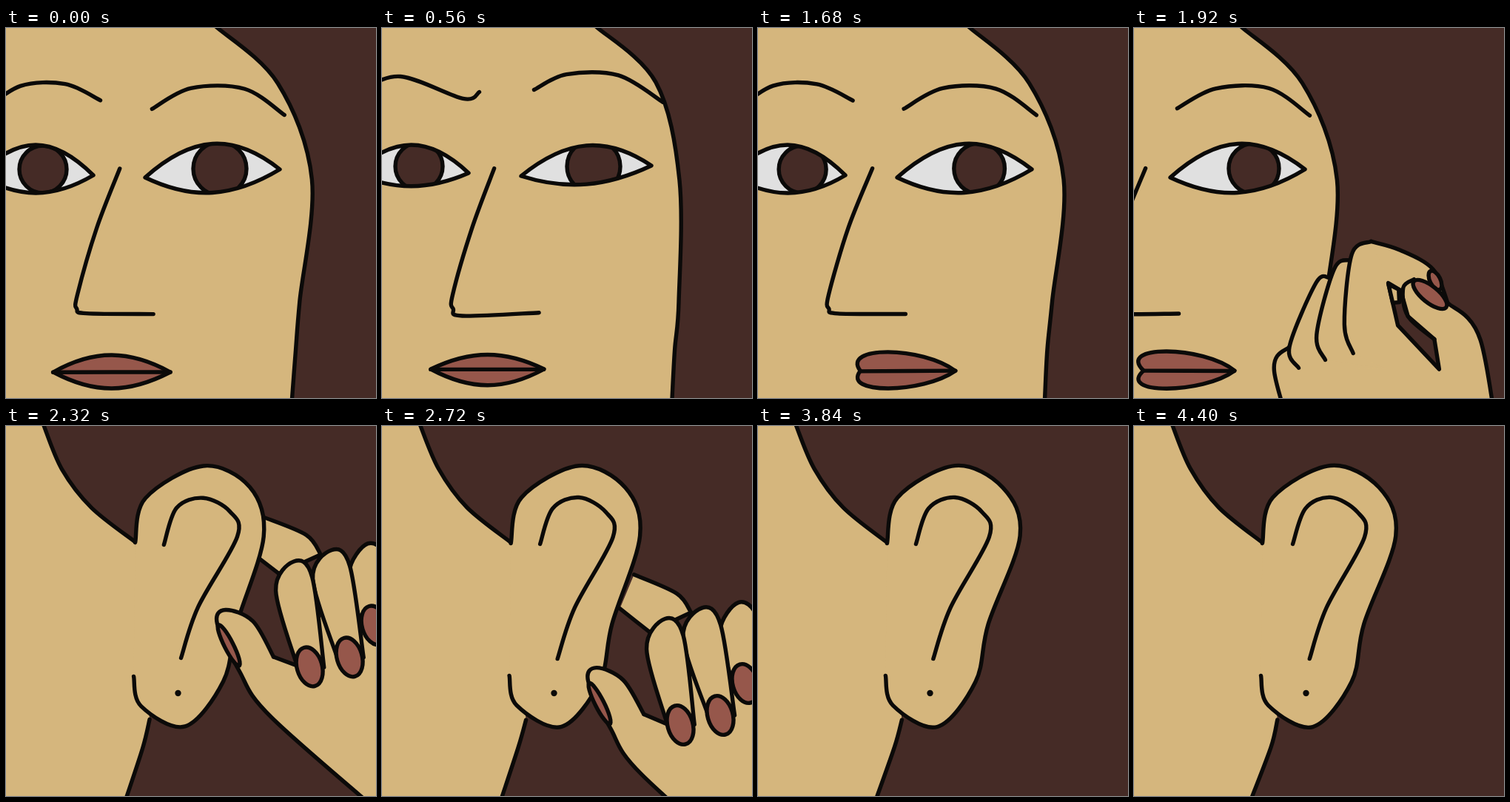
An HTML page with a canvas that plays this animation: 500 by 500 pixels, repeating every 4480 ms.

```html
<!DOCTYPE html>
<html lang="en">
<head>
<meta charset="utf-8">
<title>Tucking hair</title>
<style>
html, body { margin: 0; width: 100%; height: 100%; overflow: hidden; background: #452b26; }
canvas { display: block; width: 500px; height: 500px; }
</style>
</head>
<body>
<canvas id="stage" width="500" height="500"></canvas>
<script>
const ctx = document.getElementById('stage').getContext('2d');
const SKIN = '#d5b67d', HAIR = '#452b26', INK = '#0b0a09', WHITE = '#e0e0e0', LIP = '#96574b';
const LOOP = 4480, STEP = 80;
let frame = 0;

const linear = (t, a, b) => Math.min(1, Math.max(0, (t - a) / (b - a)));
const ease = (t, a, b) => {
  const k = linear(t, a, b);
  return k * k * (3 - 2 * k);
};
const lerp = (a, b, k) => a + (b - a) * k;
const mix = (from, to, k) => from.map(([x, y], i) => [lerp(x, to[i][0], k), lerp(y, to[i][1], k)]);

// Hand-drawn jitter, shared by points at the same place.
const wobble = ([x, y]) => {
  const s = Math.round(x) * 12.9 + Math.round(y) * 7.3 + frame * 41.7;
  return [x + 0.6 * Math.sin(s), y + 0.6 * Math.cos(s * 1.7)];
};

// Smooth sections through key points, joined by straight lines.
function spline(...sections) {
  const path = new Path2D();
  sections.forEach((points, n) => {
    const p = points.map(wobble);
    if (n) path.lineTo(...p[0]); else path.moveTo(...p[0]);
    for (let i = 0; i < p.length - 1; i++) {
      const b = p[i], c = p[i + 1], a = p[i - 1] || b, d = p[i + 2] || c;
      path.bezierCurveTo(b[0] + (c[0] - a[0]) / 6, b[1] + (c[1] - a[1]) / 6,
        c[0] - (d[0] - b[0]) / 6, c[1] - (d[1] - b[1]) / 6, ...c);
    }
  });
  return path;
}

function polygon(...points) {
  const path = new Path2D();
  points.forEach(p => path.lineTo(...wobble(p)));
  path.closePath();
  return path;
}

// Two arcs between two corners; a lower lead swells the first end.
function lens(x0, y0, x1, y1, top, bottom, lead = 0.35) {
  const at = (k, rise) => wobble([lerp(x0, x1, k), lerp(y0, y1, k) + rise * 4 / 3]);
  const path = new Path2D();
  path.moveTo(x0, y0);
  path.bezierCurveTo(...at(lead, -top), ...at(0.65, -top), x1, y1);
  path.bezierCurveTo(...at(0.65, bottom), ...at(lead, bottom), x0, y0);
  path.closePath();
  return path;
}

function oval(x, y, rx, ry = rx, angle = 0) {
  const path = new Path2D();
  path.ellipse(x, y, rx, ry, angle, 0, 2 * Math.PI);
  return path;
}

function fill(path, color) {
  ctx.fillStyle = color;
  ctx.fill(path);
}
const ink = path => ctx.stroke(path);
function shape(path, color) {
  fill(path, color);
  ink(path);
}
const nail = (...args) => shape(oval(...args), LIP);

function at(x, y, draw) {
  ctx.save();
  ctx.translate(x, y);
  draw();
  ctx.restore();
}

function eye(outline, iris) {
  fill(outline, WHITE);
  ctx.save();
  ctx.clip(outline);
  shape(iris, HAIR);
  ctx.restore();
  ink(outline);
}

function drawFace(t) {
  const s = ease(t, 160, 400) - ease(t, 1040, 1440); // squint
  const look = ease(t, 1440, 1760);
  const pan = 139 * linear(t, 1680, 1920) + 136 * linear(t, 1920, 2080);

  at(-Math.min(pan, 232), 0, () => {
    const edge = [[284, -2], [367, 74], [413, 205], [397, 370], [391, 435], [387, 502]]
      .map(([x, y]) => [x + s * (5 - 16 * Math.exp(-(((y - 200) / 90) ** 2))), y]);
    fill(spline(edge, [[-300, 520]], [[-300, -20]]), SKIN);
    ink(spline(edge));
  });

  at(-pan, 0, () => {
    eye(lens(-38, 199 - 3 * s, 118 - s, 199 - 3 * s, 41 - 3 * s, 24 - 6 * s),
      oval(50 + 12 * look, 191 - 4 * s, 32));
    eye(lens(188, 202 - 2 * s, 370 - 6 * s, 191 - 5 * s, 40 - 6 * s, 26 - 8 * s),
      oval(289 - 3 * s + 12 * look, 190 - 3 * s, 36 - 2 * look));
    ink(spline(mix([[-30, 112], [20, 78], [80, 76], [128, 98]], [[-30, 84], [25, 66], [110, 96], [131, 86]], s)));
    ink(spline(mix([[197, 109], [250, 82], [322, 82], [376, 118]], [[206, 83], [250, 62], [320, 64], [380, 100]], s)));
    ink(spline([[154 - 3 * s, 190], [122, 270], [96, 360], [96, 380], [108, 386 + 3 * s], [199 + 13 * s, 386 - s]]));

    const left = 64 + 2 * s + 88 * look, right = 222 - 3 * s + 53 * look, y = 465 - 4 * s - 2 * look;
    shape(lens(left, y, right, y, 23 - 3 * s + 3 * look, 22 + 2 * look, 0.35 - 0.65 * look), LIP);
    ink(spline([[left, y], [right, y]]));
  });

  if (t >= 1760) {
    const rise = linear(t, 1760, 1920), lift = linear(t, 1920, 2080);
    at(60 * (1 - rise) + 20 * lift, 210 * (1 - rise) - 60 * lift, drawFist);
  }
}

function drawFist() {
  const wrist = [[230, 600], [190, 465], [210, 430]];
  const back = [[320, 289], [360, 300], [404, 326], [424, 372]];
  const arm = [[424, 372], [468, 422], [498, 600]];
  fill(spline(wrist, back, arm), SKIN);
  ink(spline(wrist));
  for (let k = 0; k < 3; k++) {
    const finger = [[264 + 28 * k, 337 - 24 * k], [246 + 24 * k, 344 - 19 * k],
      [210 + 37 * k, 430 - 15 * k], [222 + 37 * k, 459 - 10 * k]];
    fill(spline(finger, [[340, 460]], [[340, 330]]), SKIN);
    ink(spline(finger));
  }
  ink(spline(back, arm));

  const thumb = [[406, 421], [370, 390], [364, 352], [378, 340]];
  shape(polygon([343, 345], [356, 402], [413, 461], [406, 421], [370, 390], [361, 354]), HAIR);
  shape(polygon([344, 346], [358, 354], [358, 370], [350, 371]), SKIN);
  ink(spline(thumb));
  nail(407, 341, 14, 7, 1.1);
  nail(400, 360, 28, 11, 0.68);
}

function drawOpenHand() {
  const thumb = [[354, 390], [326, 343], [290, 327], [278, 345], [308, 408], [352, 472], [520, 620]];
  fill(spline(thumb, [[900, 800]], [[900, 300]], [[470, 300]], [[400, 350]], [[390, 405]]), SKIN);
  ink(spline(thumb));
  ink(spline([[354, 390], [384, 402]]));
  nail(294, 375, 6, 31, -0.47);

  // Knuckle and nail of each finger, the farthest first.
  [[482, 238, 491, 348], [432, 246, 457, 391], [382, 261, 403, 404]].forEach(([x, y, nx, ny]) => {
    shape(spline([[nx - 17, ny], [x - 25, y + 40], [x, y], [x + 25, y + 22], [nx + 19, ny]]), SKIN);
    nail(nx, ny, 17, 27, -0.28);
  });
}

function drawEar(t) {
  const rest = ease(t, 2720, 3040);
  const slide = linear(t, 2160, 2720), leave = linear(t, 2720, 3040);
  const x = 10 * (1 - slide) + 250 * leave, y = 110 * (slide - 1) + 90 * leave;

  at(x, y, () => shape(spline([[340, 201], [398, 226], [418, 252]], [[362, 278], [322, 247]]), SKIN));

  const hairline = [[51, -2], [76, 58], [115, 110], [174, 157]];
  const neck = [[194, 397], [185, 434], [162 - 2 * rest, 502]];
  const rim = spline([[174, 158], [188, 97], [266, 54], [329 + 2 * rest, 83], [348 + 6 * rest, 149],
    [311, 268], [294, 345], [242, 406], [182, 378], [172, 338]]);
  fill(spline(hairline, neck, [[-20, 520]], [[-20, -20]]), SKIN);
  ink(spline(hairline));
  ink(spline(neck));
  shape(rim, SKIN);
  ink(spline([[214, 160], [231, 111], [266, 97], [302, 116], [312, 150], [260, 245], [237, 314]]));
  fill(oval(232.5, 361, 4.2), INK);

  at(x, y, drawOpenHand);
}

function render() {
  frame = Math.floor(performance.now() % LOOP / STEP);
  const t = frame * STEP;
  ctx.fillStyle = HAIR;
  ctx.fillRect(0, 0, 500, 500);
  ctx.strokeStyle = INK;
  ctx.lineWidth = 5.4;
  ctx.lineCap = ctx.lineJoin = 'round';
  if (t < 2160) drawFace(t); else drawEar(t);
  requestAnimationFrame(render);
}
render();
</script>
</body>
</html>
```
